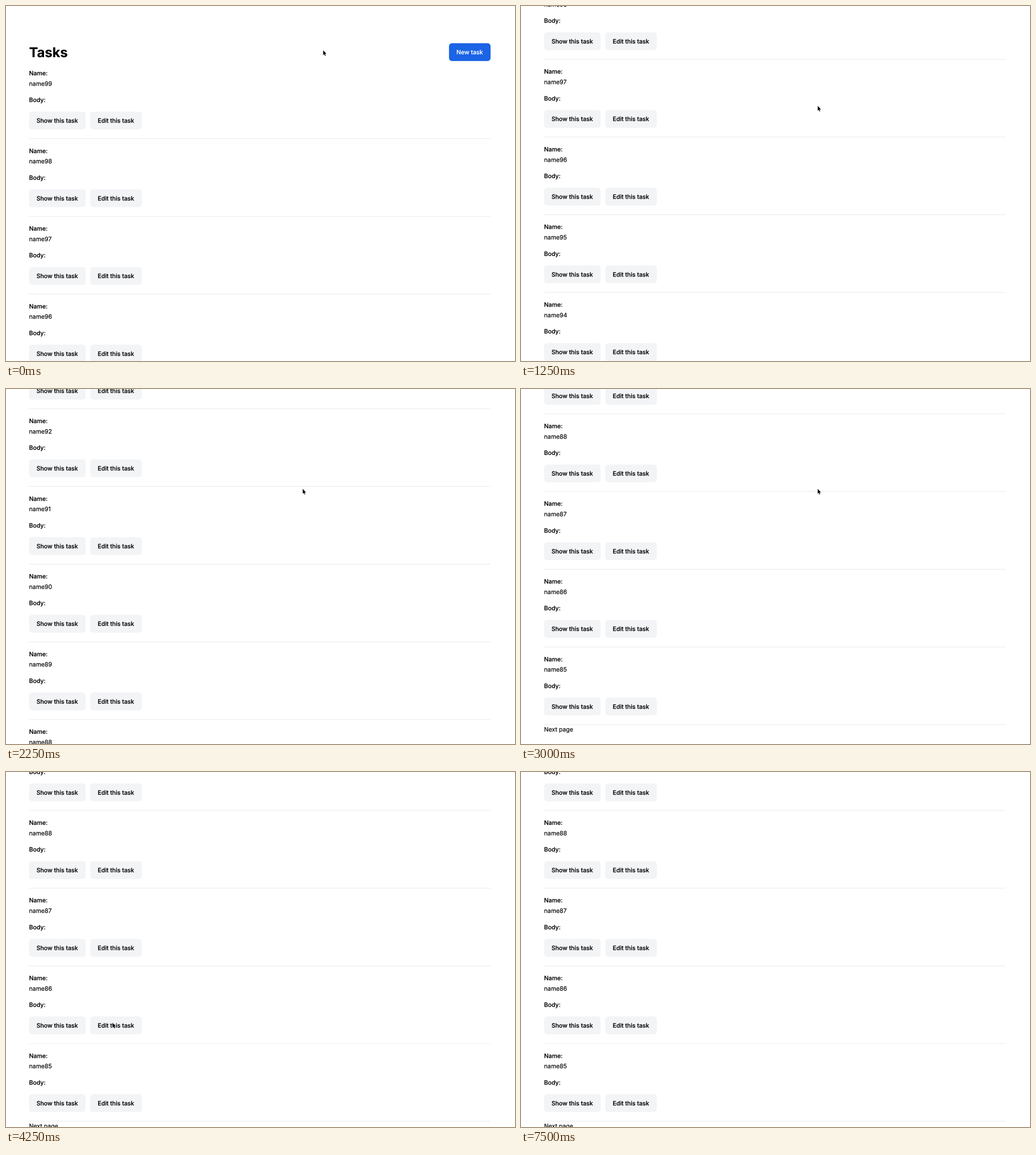
These frames come from a looping animation (896 by 625 pixels, 8 s). An HTML page with a canvas:

```html
<!DOCTYPE html>
<html lang="en">
<head>
<meta charset="utf-8">
<title>Tasks</title>
<style>
  html, body { margin: 0; width: 100%; height: 100%; overflow: hidden; background: #fff; }
  canvas { display: block; width: 896px; height: 625px; }
</style>
</head>
<body>
<canvas id="stage" width="896" height="625"></canvas>
<script>
const W = 896, H = 625, LOOP = 8000, TICK = 250;
const LEFT = 40.6, RIGHT = 853, PITCH = 136.77, COUNT = 15;
const SIZE = 10.51;

// Key points are [time, ...values]; the scroll overshoots the end and settles.
const scrollPath = [[878, 0], [2250, 1019.4], [2500, 1286], [3000, 1557.5], [3500, 1533.5]];
const pointerPath = [
  [0, 558, 77.5], [250, 522, 175.4], [3500, 522, 175.4], [4000, 247, 392.5],
  [4250, 187, 441], [4500, 187, 441], [4750, 69.5, 600], [5250, 61, 605],
  [5500, 172, 616], [6000, 212, 628]
];

// Drawn at double size, then halved, so text can sit between whole pixels.
const SCALE = 2;
const view = document.getElementById('stage').getContext('2d');
const buffer = document.createElement('canvas');
buffer.width = W * SCALE;
buffer.height = H * SCALE;
const ctx = buffer.getContext('2d');
ctx.scale(SCALE, SCALE);
ctx.textRendering = 'geometricPrecision';
ctx.lineJoin = 'round';

function along(path, t) {
  const next = path.findIndex(point => point[0] > t);
  if (next === 0) return path[0].slice(1);
  if (next < 0) return path.at(-1).slice(1);
  const [t0, ...from] = path[next - 1];
  const [t1, ...to] = path[next];
  return from.map((v, i) => v + (to[i] - v) * (t - t0) / (t1 - t0));
}

function text(str, x, y, weight = 400, color = '#000', size = SIZE) {
  ctx.font = `${weight} ${size}px Inter, sans-serif`;
  ctx.fillStyle = ctx.strokeStyle = color;
  ctx.lineWidth = 0.18;
  ctx.fillText(str, x, y);
  ctx.strokeText(str, x, y);
}

function button(label, x, y, w, bg, color) {
  ctx.fillStyle = bg;
  ctx.beginPath();
  ctx.roundRect(x, y, w, 31.4, 5.25);
  ctx.fill();
  text(label, x + 13.1, y + 19.6, 500, color);
}

function task(number, y) {
  text('Name:', LEFT, y + 122, 500);
  text('name' + number, LEFT, y + 140.4);
  text('Body:', LEFT, y + 169.2, 500);
  button('Show this task', LEFT, y + 186, 99.5, '#f3f4f6', '#000');
  button('Edit this task', 148.4, y + 186, 90.6, '#f3f4f6', '#000');
  ctx.fillStyle = '#e5e7eb';
  ctx.fillRect(LEFT, y + 233.2, RIGHT - LEFT, 0.8);
}

function page(scroll) {
  text('Tasks', LEFT, 89.8 - scroll, 700, '#000', 23.65);
  button('New task', 779.8, 65.5 - scroll, 73.2, '#1a64e5', '#fff');
  for (let i = 0; i < COUNT; i++) task(99 - i, i * PITCH - scroll);
  text('Next page', LEFT, (COUNT - 1) * PITCH + 245.8 - scroll);
}

const arrow = new Path2D('M0.4 0.4V9L2.2 7.3L3.6 10.4L4.8 9.9L3.5 6.8H6Z');

function pointer(x, y) {
  ctx.save();
  ctx.translate(x, y);
  ctx.lineWidth = 0.9;
  ctx.strokeStyle = '#fff';
  ctx.stroke(arrow);
  ctx.fillStyle = '#000';
  ctx.fill(arrow);
  ctx.restore();
}

let shown = -1;

function draw() {
  const now = performance.now() % LOOP;
  const t = now - now % TICK;
  if (t !== shown) {
    shown = t;
    ctx.fillStyle = '#fff';
    ctx.fillRect(0, 0, W, H);
    page(...along(scrollPath, t));
    pointer(...along(pointerPath, t));
    view.drawImage(buffer, 0, 0, W, H);
  }
  requestAnimationFrame(draw);
}
draw();
</script>
</body>
</html>
```
